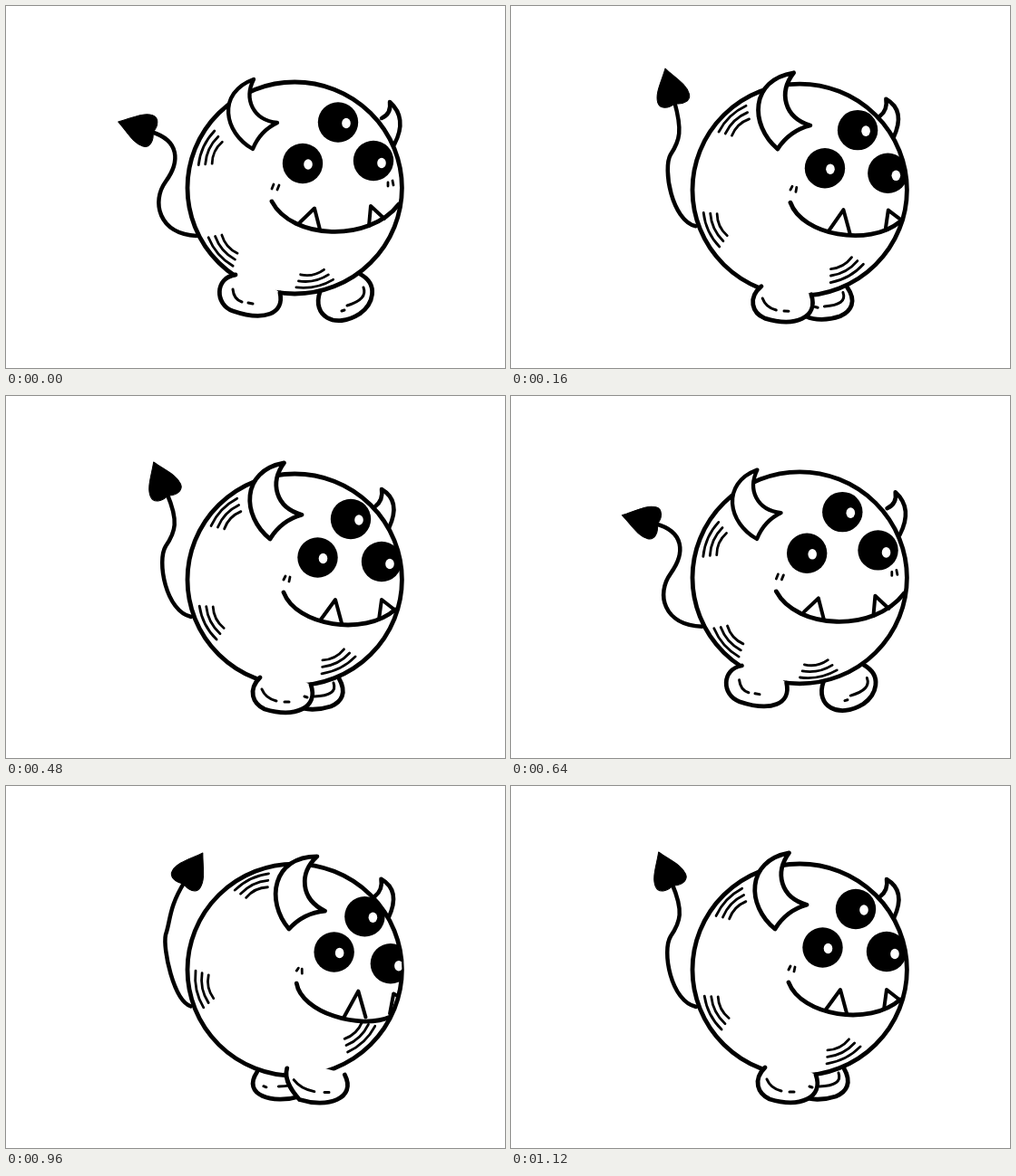
An HTML page with a canvas for the animation above (1280 ms loop, 550 by 400 pixels).

```html
<!DOCTYPE html>
<html lang="en">
<head>
<meta charset="utf-8">
<title>Walking monster</title>
<style>
html, body { margin: 0; width: 100%; height: 100%; overflow: hidden; background: #fff; }
canvas { display: block; }
</style>
</head>
<body>
<canvas id="stage" width="550" height="400"></canvas>
<script>
const ctx = document.getElementById('stage').getContext('2d');
const STEP = 160;

// How far the monster has swung: 0 leaning back, 1 upright, 2 leaning forward.
const bodySwing = [0, 1.15, 2.1, 1, -0.05, 0.95, 2.1, 1];
const footSwing = [0, 0.85, 2.1, 1, 0.05, 1, 2.1, 1];

const radians = degrees => degrees * Math.PI / 180;
const mix = (a, b, k) => a + (b - a) * k;
// Height climbs quickly at first, then levels out along an arc.
const rise = s => s * (1.45 - 0.45 * s);

// Blends two path strings; x and y may follow different progress.
function morph(back, upright, kx, ky = kx) {
  const goal = upright.match(/[\d.]+/g);
  let i = 0;
  return new Path2D(back.replace(/[\d.]+/g, v => mix(+v, +goal[i], i++ % 2 ? ky : kx)));
}

function ink(path, width, fill) {
  if (fill) {
    ctx.fillStyle = fill;
    ctx.fill(path);
  }
  ctx.lineWidth = width;
  ctx.stroke(path);
}

function disc(x, y, rx, ry, color) {
  ctx.fillStyle = color;
  ctx.beginPath();
  ctx.ellipse(x, y, rx, ry, 0, 0, Math.PI * 2);
  ctx.fill();
}

function placed(x, y, degrees, scale, paint) {
  ctx.save();
  ctx.translate(x, y);
  ctx.rotate(radians(degrees));
  ctx.scale(scale, scale);
  paint();
  ctx.restore();
}

const heart = new Path2D('M38 0 C25 -8 15 -18 4 -18 C-4 -18 -6 -8 -2 0 C-6 8 -4 18 4 18 C15 18 25 8 38 0Z');
const horn = new Path2D('M0 0 C-32 -18 -40 -62 1 -77 C-10 -55 0 -32 27 -29 Q8 -20 0 0Z');

function drawTail(s) {
  const up = rise(s);
  const x = 160 + 17.5 * s, y = 139 - 31 * up;
  const angle = 197 + 50 * s;
  const dx = Math.cos(radians(angle)), dy = Math.sin(radians(angle));
  const path = new Path2D();
  path.moveTo(x, y);
  path.bezierCurveTo(x - 33 * dx, y - 33 * dy, 192 - 5 * s, 172 - 22 * up, 176, 194 - 28 * up);
  path.bezierCurveTo(160 + 6 * s, 216 - 34 * up, 168 + 8 * s, 252 - 14 * up, 210 - 6 * up, 254 - 10 * up);
  ink(path, 4.5);
  placed(x, y, angle, 1, () => ink(heart, 1, '#000'));
}

function drawFarFoot(f) {
  const up = rise(f);
  ink(morph('M390 296 C412 308 404 330 390 340 C362 358 337 342 346 316',
    'M367 312 C376 328 370 338 358 343 C330 352 300 342 313 316', f, up), 4.8, '#fff');
  ink(morph('M394 311 Q399 324 376 331', 'M361 317 Q366 331 340 332', f, up), 3);
}

function drawNearFoot(f) {
  const up = rise(f);
  const foot = morph('M253 297 C230 300 230 330 250 337 C285 349 307 340 302 317',
    'M280 311 C266 325 272 340 285 346 C318 356 345 345 336 319', f, up);
  // The fill reaches up into the body to open its outline.
  const cover = new Path2D(foot);
  cover.quadraticCurveTo(278 + 30 * f, 297 + 8 * up, 253 + 27 * f, 297 + 14 * up);
  ctx.fillStyle = '#fff';
  ctx.fill(cover);
  ink(foot, 4.8);
  ink(morph('M250 313 Q251 324 260 327 M267 328 L272 329 M370 337 L373 336',
    'M282 324 Q286 334 298 337 M307 338 L312 338 M329 332 L332 333', f, up), 3);
}

// Three shortening strokes that follow the curve of the body.
function drawHatch(degrees) {
  const path = new Path2D();
  for (let i = 0; i < 3; i++) {
    const r = 109 - 7 * i, half = 11 - 1.5 * i;
    const at = (turn, radius) =>
      [318 + radius * Math.cos(radians(degrees + turn)), 202 + radius * Math.sin(radians(degrees + turn))];
    path.moveTo(...at(-half, r));
    path.quadraticCurveTo(...at(0, r + 5), ...at(half, r));
  }
  ink(path, 2.8);
}

function drawEye(x, y, shineX, shineY) {
  disc(x, y, 22.2, 22.2, '#000');
  disc(x + shineX, y + shineY, 4.8, 5.8, '#fff');
}

function drawFace(s) {
  ink(morph('M295 197 L293 202 M301 198 L299 203 M421 195 L421 199 M426 193 L427 198',
    'M308 199 L306 203 M313 200 L312 205 M445 206 L445 210 M448 204 L449 209', s), 2.8);
  ink(morph('M324 239 L340 223.5 L346 247 M400 243 L402 221 L417 235',
    'M347 247 L363 225 L370 251 M411 247 L414 225 L428 236', s), 4);
  ink(morph('M293 216 C315 258 400 262 433 219', 'M306 217 C320 254 395 266 429 236', s), 4.8);
  drawEye(327 + 16.5 * s, 174 + 4.5 * s, 6, 1);
  drawEye(366 + 14 * s, 128.5 + 7.5 * s, 9, 1);
  drawEye(405 + 9 * s, 171 + 12 * s, 9, 2.5);
}

function drawMonster(step) {
  const s = bodySwing[step], f = footSwing[step], up = rise(s);
  ctx.fillStyle = '#fff';
  ctx.fillRect(0, 0, 550, 400);
  ctx.strokeStyle = '#000';
  ctx.lineCap = ctx.lineJoin = 'round';

  drawTail(s);
  ink(morph('M414 124 Q425 119 423 106 Q443 124 428 153',
    'M407 122 Q416 115 414 103 Q436 116 422 146', up), 4.5, '#fff');
  drawFarFoot(f);

  const body = new Path2D();
  body.ellipse(318.2, 201 + 2 * up, 118.2, 117, 0, 0, Math.PI * 2);
  ink(body, 4.8, '#fff');
  drawNearFoot(f);

  ctx.save();
  ctx.clip(body);
  drawHatch(205 + 18.5 * s);
  drawHatch(139.5 + 13.5 * s);
  drawHatch(78 - 15 * s);
  drawFace(s);
  ctx.restore();
  placed(272 + 19 * s, 158, 9.7 * s, 1 + 0.11 * up, () => ink(horn, 4.3, '#fff'));
}

const start = performance.now();
let shown = -1;
function tick() {
  const elapsed = Math.max(0, performance.now() - start);
  const step = Math.floor(elapsed / STEP) % bodySwing.length;
  if (step !== shown) drawMonster(shown = step);
  requestAnimationFrame(tick);
}
tick();
</script>
</body>
</html>
```
